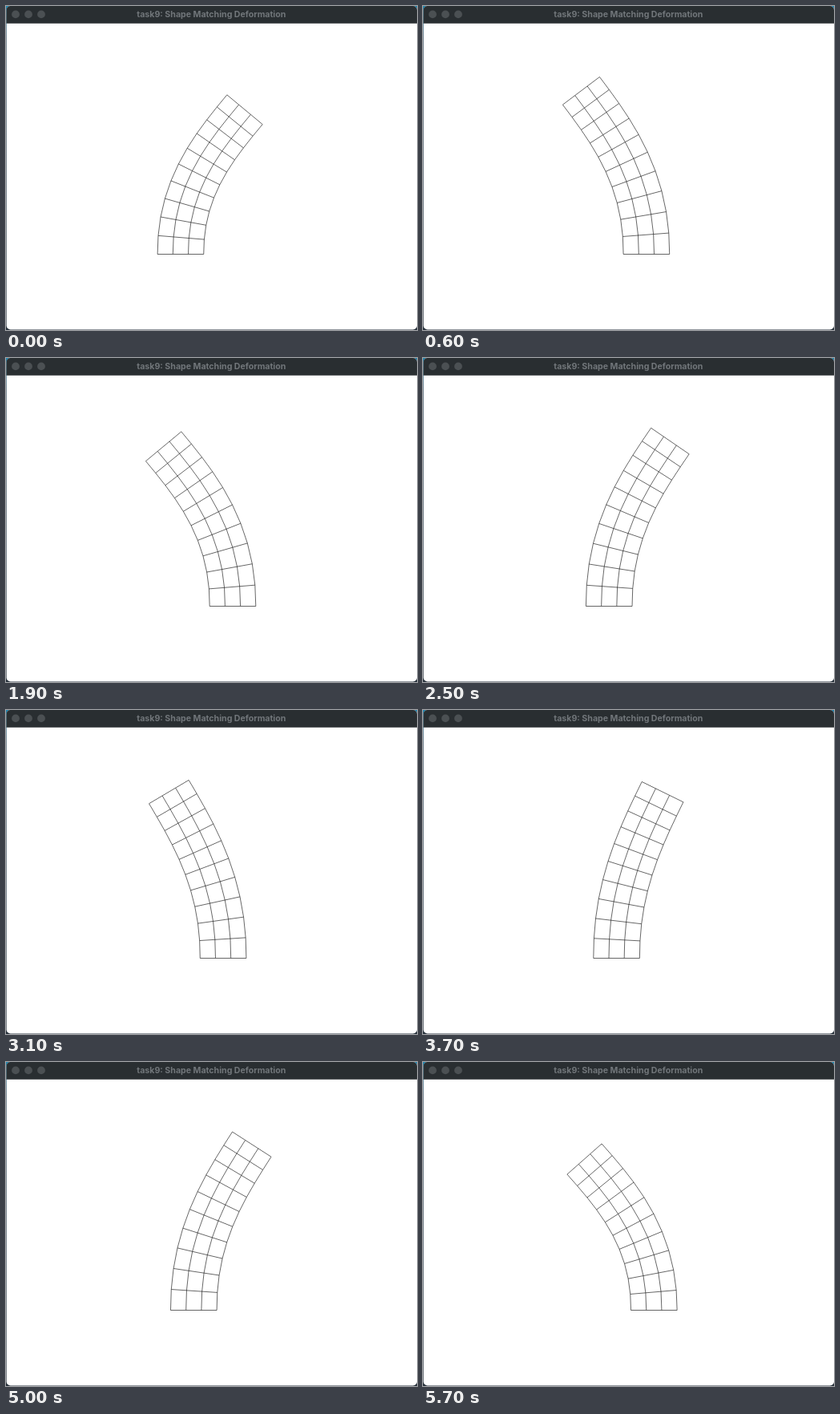
An HTML page with a canvas for the animation above (5800 ms loop, 513 by 404 pixels).

```html
<!DOCTYPE html>
<html lang="en">
<head>
<meta charset="utf-8">
<title>Shape Matching Deformation</title>
<style>
  html, body { margin: 0; width: 100%; height: 100%; overflow: hidden; background: #fff; }
  canvas { display: block; }
</style>
</head>
<body>
<canvas width="513" height="404"></canvas>
<script>
const ctx = document.querySelector('canvas').getContext('2d');
const LOOP = 5800, STEP = 100;
const ROWS = 10, COLS = 3, CELL = 19.2;
const CENTER_X = 253.9, BASE_Y = 309.5, SWAY = 36;

// Swing phase over the uneven recording: [step, degrees]
const swing = [[0, 362], [6, 226], [14, -8], [25, -307], [37, -650], [48, -1005], [50, -1023], [57, -1243]];

const rad = deg => deg * Math.PI / 180;
const cos = deg => Math.cos(rad(deg));
const sin = deg => Math.sin(rad(deg));

function phaseAt(step) {
  const i = Math.max(1, swing.findIndex(([s]) => s >= step));
  const [s0, p0] = swing[i - 1], [s1, p1] = swing[i];
  return p0 + (p1 - p0) * (step - s0) / (s1 - s0);
}

// The base sways; the beam bends after it and stretches twice per swing
function beamGrid(phase) {
  const bend = 41.5 * cos(phase - 19);
  const stretch = 1.6 + 3.45 * cos(2 * (phase - 47));
  const tilt = s => bend * sin(90 * s) ** 1.15;
  let x = CENTER_X - SWAY * cos(phase), y = BASE_Y;
  const grid = [];
  for (let r = 0; r <= ROWS; r++) {
    const across = tilt(r / ROWS);
    grid.push(Array.from({ length: COLS + 1 }, (_, c) => {
      const d = (c - COLS / 2) * CELL;
      return [x + d * cos(across), y + d * sin(across)];
    }));
    const mid = (r + 0.5) / ROWS;
    const length = CELL + stretch * cos(90 * mid);
    x += length * sin(tilt(mid));
    y -= length * cos(tilt(mid));
  }
  return grid;
}

function fillBox(color, x, y, w, h, radii) {
  ctx.fillStyle = color;
  ctx.beginPath();
  ctx.roundRect(x, y, w, h, radii);
  ctx.fill();
}

function drawWindow() {
  const desk = ctx.createLinearGradient(0, 0, 0, 404);
  desk.addColorStop(0, '#1f86b0');
  desk.addColorStop(0.1, '#2b4458');
  desk.addColorStop(1, '#27313b');
  fillBox(desk, 0, 0, 513, 404, 0);
  fillBox('#fff', 0.6, 0, 512.4, 403.5, 5);
  fillBox('#292e31', 0.5, 0, 512.5, 21.7, [5, 5, 0, 0]);
  ctx.fillStyle = '#4b5053';
  for (const x of [12, 28, 44]) {
    ctx.beginPath();
    ctx.arc(x, 10.4, 4.9, 0, 2 * Math.PI);
    ctx.fill();
  }
  ctx.fillStyle = '#71767a';
  ctx.font = '700 10.6px Inter, sans-serif';
  ctx.textAlign = 'center';
  ctx.fillText('task9: Shape Matching Deformation', 256.3, 14);
}

function drawBeam(grid) {
  const line = pts => pts.forEach(([x, y], i) => i ? ctx.lineTo(x, y) : ctx.moveTo(x, y));
  ctx.beginPath();
  grid.forEach(line);
  for (let c = 0; c <= COLS; c++) line(grid.map(row => row[c]));
  ctx.strokeStyle = '#000';
  ctx.lineWidth = 0.6;
  ctx.stroke();
}

const t0 = performance.now();
function frame() {
  const step = Math.floor((performance.now() - t0) % LOOP / STEP);
  drawWindow();
  drawBeam(beamGrid(phaseAt(step)));
  requestAnimationFrame(frame);
}
frame();
</script>
</body>
</html>
```
